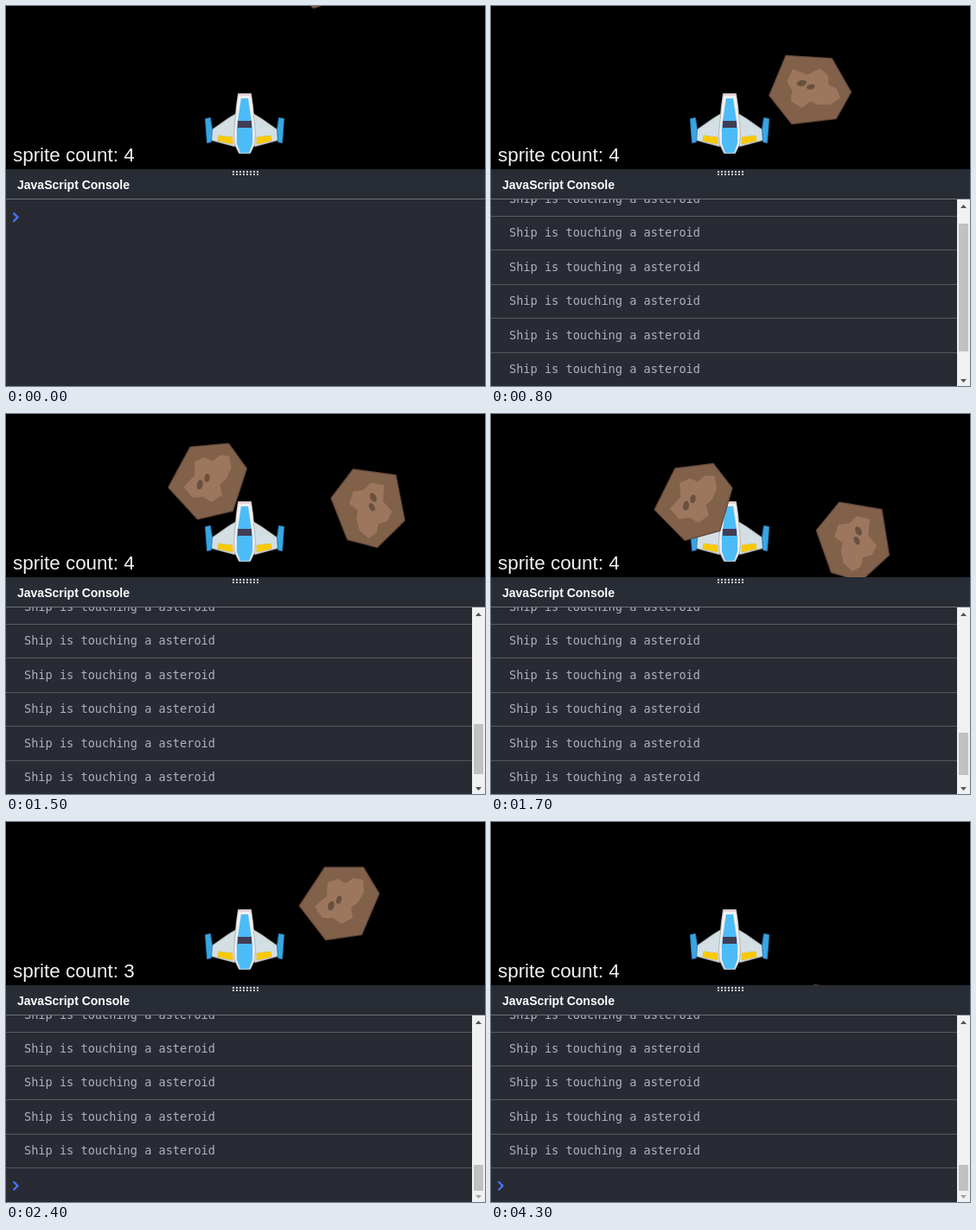
Write an HTML page with a canvas that moves like this. It is 554 px wide and 440 px high and loops after 4.41 s.

```html
<!DOCTYPE html>
<html lang="en">
<head>
<meta charset="utf-8">
<title>Sprite game with console</title>
<style>
html, body { margin: 0; width: 100%; height: 100%; overflow: hidden; background: #000; }
canvas { display: block; }
</style>
</head>
<body>
<canvas id="stage" width="554" height="440"></canvas>
<script>
const ctx = document.getElementById('stage').getContext('2d');
const LOOP = 4410, FLOOR = 189, ROW = 39.4, TOP = 224, VIEW = 216;

// Screen updates: [first, last, count]
const UPDATES = [[0, 0, 1], [300, 800, 12], [830, 870, 2], [1030, 1500, 10], [1530, 1530, 1],
  [1570, 2070, 8], [2130, 2400, 6], [2430, 2630, 5], [3200, 3200, 1], [4300, 4300, 1]];

// x, angle and slopes are taken where y is 95; fall is time, y, time, y, ...
const ROCKS = [
  { x: 366, angle: 60, drift: 0, spin: .08, fall: [300, -40, 800, 97, 870, 117, 1030, 120, 1470, 250] },
  { x: 234.8, angle: -6.3, drift: .05, spin: -.0825, fall: [1030, -50, 1500, 79, 2070, 176, 2300, 250] },
  { x: 419, angle: 135, drift: 0, spin: .05, fall: [1030, -55, 1500, 105, 2030, 250] },
  { x: 386, angle: 0, drift: 0, spin: .05, fall: [2130, -67, 2630, 233] }
];
const SPAWNS = [1030, 2130, 3200, 4300];
const REMOVALS = [1450, 1980, 2280, 2630];
const LOGS = [650, 0, 800, 6, 1500, 17, 2070, 33, 2130, 34];

const ROCK = new Path2D('M-17-42L27-42L45-12L25 35L-16 41L-46 2Z');
const PATCH = new Path2D('M-14-25L-2-29L7-24L16-30L27-28L28-14L21-2L13 4L15 16L2 23L-8 16L-20 16L-29 3L-15-9Z');
const WING = new Path2D('M-8-12L-18-6L-38 8L-38 19L-12 26Z');
const FIN = new Path2D('M-45-5L-40-6L-38 7L-39 21L-43 22L-44 10Z');
const FLAME = new Path2D('M-30 14L-14 16L-14 24L-31 20Z');
const HULL = new Path2D('M-7-34L7-34L9-20L12 12L11 24L6 34L-6 34L-11 24L-12 12L-9-20Z');
const CORE = new Path2D('M-4-29L4-29L9 5L9 23L5 34L-5 34L-9 23L-9 5Z');

function interp(keys, t) {
  if (t <= keys[0]) return keys[1];
  for (let i = 2; i < keys.length; i += 2) {
    if (t <= keys[i]) {
      const k = (t - keys[i - 2]) / (keys[i] - keys[i - 2]);
      return keys[i - 1] + k * (keys[i + 1] - keys[i - 1]);
    }
  }
  return keys[keys.length - 1];
}

function lastUpdate(t) {
  const [start, end, count] = UPDATES.filter(u => u[0] <= t).pop();
  if (count === 1) return start;
  const step = (end - start) / (count - 1);
  return start + Math.floor((Math.min(t, end) - start) / step + 1e-6) * step;
}

function box(x, y, w, h, color) {
  ctx.fillStyle = color;
  ctx.fillRect(x, y, w, h);
}

function shape(path, fill, edge, width = 1.5) {
  if (edge) {
    ctx.strokeStyle = edge;
    ctx.lineWidth = width;
    ctx.stroke(path);
  }
  ctx.fillStyle = fill;
  ctx.fill(path);
}

function text(string, x, y, font, color) {
  ctx.font = font;
  ctx.fillStyle = color;
  ctx.fillText(string, x, y);
}

function drawShip() {
  ctx.save();
  ctx.translate(276, 136);
  ctx.lineJoin = 'round';
  for (const side of [1, -1]) {
    ctx.save();
    ctx.scale(side, 1);
    shape(WING, '#d3dfe4', '#a5a8aa', 2);
    shape(FLAME, '#fbc900', '#c9bd83', 1);
    shape(FIN, '#38a6e5', '#2b79a8', 2);
    ctx.restore();
  }
  shape(HULL, '#f3f1f1', '#b8b4b4', 2);
  box(-7, -34, 14, 2, '#ecd3d6');
  shape(CORE, '#4cbcf8', '#c9dce7', 1);
  box(-8, -3, 16, 8, '#413d55');
  ctx.restore();
}

function drawRock(rock, t) {
  const y = interp(rock.fall, t);
  if (y < -48 || y > 240) return;
  ctx.save();
  ctx.translate(rock.x + rock.drift * (y - 95), y);
  ctx.rotate((rock.angle + rock.spin * (y - 95)) * Math.PI / 180);
  ctx.lineJoin = 'round';
  shape(ROCK, '#82614b', '#60473a', 2.5);
  shape(PATCH, '#9d775d');
  ctx.fillStyle = '#69503f';
  for (const [x, sy, r] of [[-10, 2, 3.5], [-1, -5, 3]]) {
    ctx.beginPath();
    ctx.ellipse(x, sy, r, r * 1.6, .3, 0, 7);
    ctx.fill();
  }
  ctx.restore();
}

function drawGame(t) {
  ctx.save();
  ctx.beginPath();
  ctx.rect(0, 0, 554, FLOOR);
  ctx.clip();
  box(0, 0, 554, FLOOR, '#000');
  drawShip();
  for (const rock of ROCKS) drawRock(rock, t);
  const past = list => list.filter(time => time <= t).length;
  const count = 4 + past(SPAWNS) - past(REMOVALS);
  text('sprite count: ' + count, 8, 180, '22.4px "Liberation Sans", Arial, sans-serif', '#f2f2f2');
  ctx.restore();
}

function arrow(y, dir, color) {
  ctx.fillStyle = color;
  ctx.beginPath();
  ctx.moveTo(543, y - dir * 2);
  ctx.lineTo(550, y - dir * 2);
  ctx.lineTo(546.5, y + dir * 2);
  ctx.fill();
}

function drawScrollbar(scroll, content, atEnd) {
  const scale = 189 / content;
  box(539, TOP, 15, VIEW, '#f1f1f1');
  box(541, Math.round(238 + scroll * scale), 11, Math.round(VIEW * scale), '#c1c1c1');
  arrow(232, -1, '#505050');
  arrow(434, 1, atEnd ? '#a3a3a3' : '#505050');
}

function drawConsole(t) {
  const rows = Math.floor(interp(LOGS, t) + 1e-6);
  const idle = t >= 2200;
  const content = (rows + 1) * ROW;
  const scroll = Math.max(0, idle ? content - VIEW : rows * ROW - VIEW - .4);

  box(0, FLOOR, 554, 251, '#292b34');
  ctx.save();
  ctx.beginPath();
  ctx.rect(0, TOP, 554, VIEW);
  ctx.clip();
  for (let i = 1; i <= rows; i++) {
    const bottom = TOP + i * ROW - scroll;
    if (bottom < TOP) continue;
    text('Ship is touching a asteroid', 21, Math.round(bottom - 15.4),
      '13.6px "DejaVu Sans Mono", monospace', '#abb2bf');
    box(0, Math.floor(bottom), 554, 1, '#58595b');
  }
  const y = TOP + rows * ROW - scroll + 20.6;
  ctx.strokeStyle = '#4776ff';
  ctx.lineWidth = 2.2;
  ctx.lineJoin = 'miter';
  ctx.beginPath();
  ctx.moveTo(8.5, y - 5);
  ctx.lineTo(13.5, y);
  ctx.lineTo(8.5, y + 5);
  ctx.stroke();
  if (content > VIEW) drawScrollbar(scroll, content, idle);
  ctx.restore();

  box(0, FLOOR, 554, 34, '#282c34');
  box(0, 223, 554, 1, '#6c6f73');
  for (let i = 0; i < 16; i++) box(262 + i % 8 * 4, i < 8 ? 191 : 194, 2, 2, '#d0d1d3');
  text('JavaScript Console', 13, 212, 'bold 14px "Liberation Sans", Arial, sans-serif', '#fff');
}

const begin = performance.now();
function draw() {
  const t = lastUpdate((performance.now() - begin) % LOOP);
  drawGame(t);
  drawConsole(t);
  requestAnimationFrame(draw);
}
draw();
</script>
</body>
</html>
```
